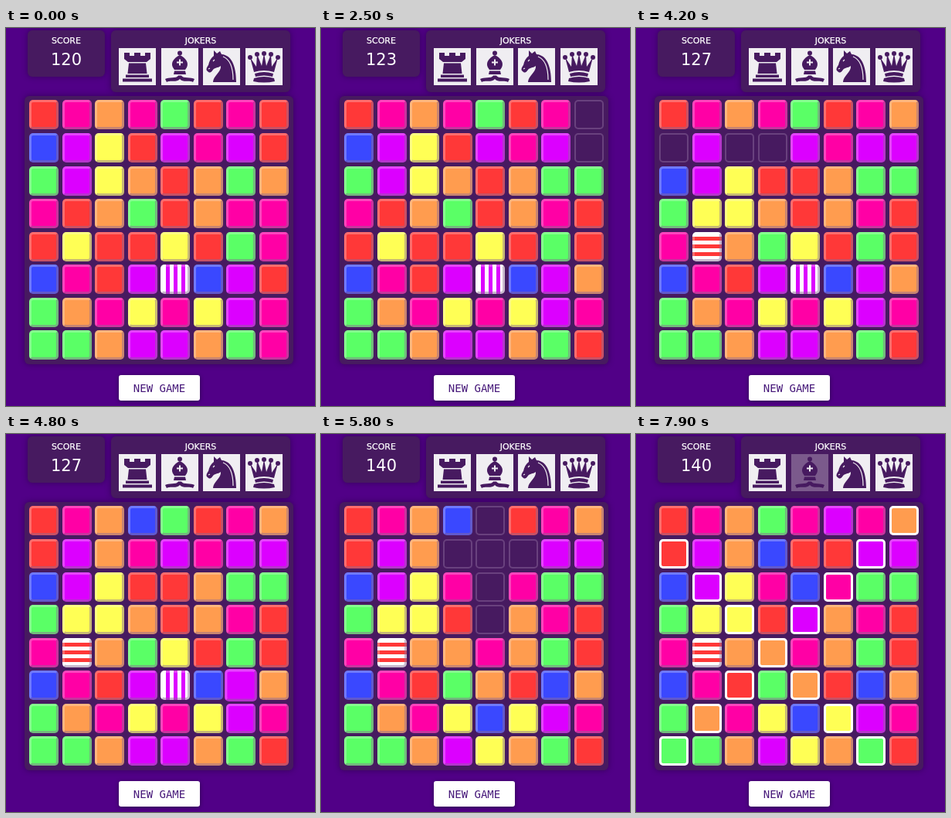
These frames come from a looping animation (400x489 px, 8000 ms). An HTML page:

```html
<!DOCTYPE html>
<html lang="en">
<head>
<meta charset="utf-8">
<title>Tile match</title>
<style>
  html, body { margin: 0; width: 100%; height: 100%; overflow: hidden; background: #510087; }
  body { position: relative; color: #fff; font-family: "DejaVu Sans", sans-serif; }
  body div, svg { position: absolute; box-sizing: border-box; }
  .panel { background: #471a60; border-radius: 6px; box-shadow: 0 0 7px rgba(30, 0, 50, .55); }
  .label, #score { left: 0; width: 100%; text-align: center; white-space: nowrap; }
  .label { top: 6px; font-size: 11px; line-height: 16px; -webkit-text-stroke: .25px #fff; }
  #score { top: 24px; font-size: 21px; line-height: 28px; }
  .joker { width: 48px; height: 48px; top: 23px; }
  .joker .back { fill: #f0eef2; }
  .joker.used .back { opacity: .3; }
  .ink { fill: #471a60; }
  .cut { fill: none; stroke: #f0eef2; stroke-width: 2; }
  .tile {
    width: 38px; height: 38px; border-radius: 5px; border: 3px solid;
    border-color: rgba(255, 255, 255, .27) rgba(140, 110, 150, .48) rgba(140, 110, 150, .48) rgba(255, 255, 255, .27);
    background-origin: border-box !important;
  }
  .tile.empty { border-width: 2px; border-color: rgba(160, 130, 175, .38); }
  .tile.lift { transform: scale(1.1); z-index: 1; }
  .tile.glow { border-color: #fff; }
  #button {
    left: 146px; top: 449px; width: 105px; height: 33px; border-radius: 3px; background: #fff;
    color: #47197a; font: 14px/34px "DejaVu Sans Mono", monospace; text-align: center;
    box-shadow: 0 1px 5px rgba(20, 0, 40, .6);
  }
</style>
</head>
<body>
<div class="panel" style="left:28px;top:3px;width:100px;height:60px">
  <div class="label">SCORE</div>
  <div id="score">120</div>
</div>
<div class="panel" style="left:136px;top:3px;width:232px;height:80px">
  <div class="label">JOKERS</div>
  <svg class="joker" style="left:10px" viewBox="0 0 48 48">
    <path class="back" d="M0 0H48V48H0z"/>
    <path class="ink" d="M7 6h7v4h6V6h8v4h6V6h7v8l-5 4H12l-5-4zM13 19.5H35L36.5 33h-25zM9 34.5H39V38H9zM5 39.5H43V43.5H5z"/>
  </svg>
  <svg class="joker" id="bishop" style="left:64.5px" viewBox="0 0 48 48">
    <path class="back" d="M0 0H48V48H0z"/>
    <circle class="ink" cx="24" cy="6.5" r="3"/>
    <path class="ink" d="M24 9C32 13 36 19 33 25L31 28H17L15 25C12 19 16 13 24 9zM17 29.5H31L32 34H16zM22 35.5H26C28 40 39 37 43 40L41 44C36 41 28 45 24 40C20 45 12 41 7 44L5 40C9 37 20 40 22 35.5z"/>
    <path class="cut" d="M24 14.5V22.5M20 18.5H28"/>
  </svg>
  <svg class="joker" style="left:119px" viewBox="0 0 48 48">
    <path class="back" d="M0 0H48V48H0z"/>
    <path class="ink" d="M14 3L18 7L22 4L24 8C37 9 43 23 43 44H13C13 36 24 31 23 23C19 26 15 25 13 28C11 31 9 33 6 30C3 28 5 25 7 22C8 17 10 13 14 10z"/>
    <path class="cut" style="stroke-width:1.2" d="M26 11C36 15 39 26 39 41M13 17L15 15M7 27L9 26"/>
  </svg>
  <svg class="joker" style="left:174px" viewBox="0 0 48 48">
    <path class="back" d="M0 0H48V48H0z"/>
    <g class="ink">
      <circle cx="6" cy="12" r="3"/><circle cx="15" cy="8" r="3"/><circle cx="24" cy="7" r="3"/>
      <circle cx="33" cy="8" r="3"/><circle cx="42" cy="12" r="3"/>
      <path d="M6 12L14 24L15 8L21 23L24 7L27 23L33 8L34 24L42 12L37 31Q24 27 11 31zM12 33Q24 29 36 33L35 37Q24 34 13 37zM11 39Q24 35 37 39L38 43Q24 46 10 43z"/>
    </g>
  </svg>
</div>
<div class="panel" style="left:24px;top:88px;width:348px;height:347px"></div>
<div id="board" style="left:30px;top:93.4px"></div>
<div id="button">NEW GAME</div>
<script>
const SIZE = 8, PITCH = 42.57, TICK = 100, LOOP = 8000;
const COLORS = {
  R: '#ff3838', P: '#ff00a5', O: '#ff9c4f', G: '#5aff66',
  B: '#3a48ff', V: '#dc00ff', Y: '#ffff55', '.': 'transparent'
};
const START = 'RPOPGRPR BVYRVPVR GVYOROGO PROGROPP RYRRYRGP BPRVvBVR GOPYPYVP GGOVVOGP';

const at = (row, col) => row * SIZE + col;
const line = (count, cell) => Array.from({ length: count }, (_, i) => cell(i));
const cells = line(SIZE * SIZE, i => i);
const bishopCells = cells.filter(i =>
  Math.abs((i >> 3) - 4) === Math.abs(i % SIZE - 3));

// Lower case marks a striped tile: v has upright stripes, r lies flat.
function background(kind) {
  const color = COLORS[kind.toUpperCase()];
  if (kind !== 'v' && kind !== 'r') return color;
  const [angle, size] = kind === 'v' ? ['90deg', '25px 100%'] : ['180deg', '100% 25px'];
  return `repeating-linear-gradient(${angle}, ${color} 0 5px, #fff 5px 10px) 50% / ${size} no-repeat #fff`;
}

function buildTimeline() {
  const spawn = [...'GVOROBYBOPVGBVRP'];
  const state = { tiles: [...START.replace(/ /g, '')], score: 120, lift: -1, glow: [], joker: false };
  const { tiles } = state;

  const lift = cell => () => { state.lift = cell; };
  const swap = (a, b) => () => {
    state.lift = -1;
    [tiles[a], tiles[b]] = [tiles[b], tiles[a]];
  };
  const match = (matched, points) => () => {
    state.glow = matched;
    state.score += points;
  };
  const clear = () => {
    state.glow.forEach(i => { tiles[i] = '.'; });
    state.glow = [];
  };
  const fall = () => {
    for (let i = 0; i < SIZE * (SIZE - 1); i++) {
      if (i < SIZE && tiles[i] === '.') tiles[i] = spawn.shift();
      if (tiles[i + SIZE] === '.') {
        tiles[i + SIZE] = tiles[i];
        tiles[i] = '.';
      }
    }
  };

  const column = line(SIZE, row => at(row, 4));
  const events = {
    1700: lift(at(5, 7)),
    1800: lift(-1),
    1900: swap(at(5, 7), at(7, 7)),
    2100: match(line(3, i => at(3 + i, 7)), 3),
    2200: clear,
    3200: lift(at(4, 1)),
    3300: lift(-1),
    3700: swap(at(4, 1), at(3, 1)),
    3900: match(line(4, i => at(4, i)), 4),
    4000: () => { clear(); tiles[at(4, 1)] = 'r'; },
    4700: lift(at(5, 6)),
    4900: lift(-1),
    5100: swap(at(5, 5), at(5, 6)),
    5400: () => {
      tiles[at(5, 4)] = 'V';
      match([...column, at(5, 3), at(5, 5)], 3)();
    },
    5500: () => { clear(); state.score += 10; },
    7000: () => { state.joker = true; },
    7700: lift(at(4, 3)),
    7900: () => { state.lift = -1; state.glow = bishopCells; }
  };

  return line(LOOP / TICK, tick => {
    events[tick * TICK]?.();
    if (!state.glow.length && tiles.includes('.')) fall();
    return { ...state, tiles: [...tiles] };
  });
}

const timeline = buildTimeline();
const board = document.getElementById('board');
const score = document.getElementById('score');
const bishop = document.getElementById('bishop');
const views = cells.map(i => {
  const tile = document.createElement('div');
  tile.style.left = (i % SIZE) * PITCH + 'px';
  tile.style.top = (i >> 3) * PITCH + 'px';
  return board.appendChild(tile);
});

function show({ tiles, score: points, lift, glow, joker }) {
  views.forEach((view, i) => {
    view.className = 'tile' + (tiles[i] === '.' ? ' empty' : '') +
      (i === lift ? ' lift' : '') + (glow.includes(i) ? ' glow' : '');
    view.style.background = background(tiles[i]);
  });
  score.textContent = points;
  bishop.classList.toggle('used', joker);
}

const begin = performance.now();
let shown = -1;
function frame() {
  const tick = Math.floor((performance.now() - begin) % LOOP / TICK);
  if (tick !== shown) show(timeline[shown = tick]);
  requestAnimationFrame(frame);
}
frame();
</script>
</body>
</html>
```
